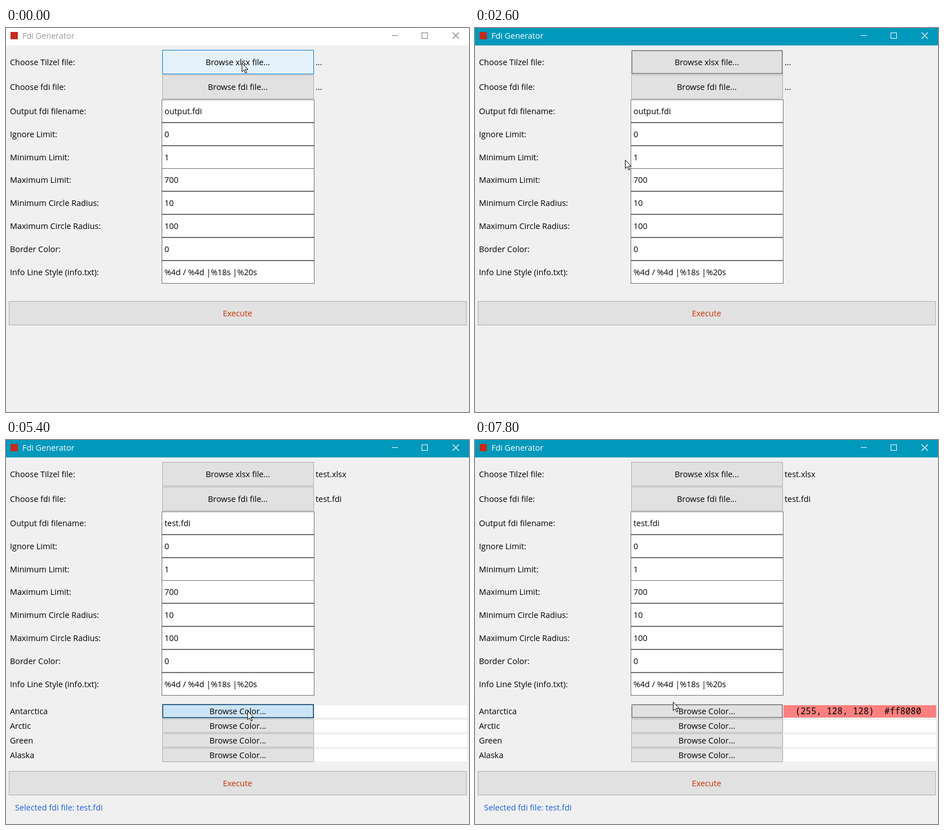
Animation, 821 px wide and 682 px high, one loop 8000 ms. Source, as an HTML page:

```html
<!DOCTYPE html>
<html lang="en">
<head>
<meta charset="utf-8">
<title>Fdi Generator</title>
<style>
  html, body { margin: 0; width: 100%; height: 100%; overflow: hidden; background: #f0f0f0; }
  svg { display: block; width: 821px; height: 682px; }
  text { font: 500 14.4px 'Open Sans', 'Noto Sans CJK SC', 'Noto Sans CJK', sans-serif; white-space: pre; }
  .cjk { font-size: 14px; font-weight: 400; }
  .mono { font: 12.4px 'Noto Sans Mono', 'Noto Sans CJK SC', monospace; }
  .lookup { font: 14.6px 'Noto Sans Mono', 'Noto Sans CJK SC', monospace; }
  .code { font: 15.5px 'Noto Sans Mono', monospace; }
  rect { shape-rendering: crispEdges; }
</style>
</head>
<body>
<svg viewBox="0 0 821 682">
  <defs>
    <g id="spectrum"></g>
    <filter id="shadow" x="-10%" y="-10%" width="120%" height="120%">
      <feGaussianBlur stdDeviation="5"/>
    </filter>
  </defs>
  <g id="stage"></g>
</svg>
<script>
const LOOP = 8000, STEP = 200, TEAL = '#0099bc';
const stage = document.getElementById('stage');
const range = n => [...Array(n).keys()];

// Drawing helpers; text is placed by its vertical centre
const box = (x, y, w, h, fill, stroke = 'none', extra = '') =>
  `<rect x="${x}" y="${y}" width="${w}" height="${h}" fill="${fill}" stroke="${stroke}" ${extra}/>`;
const path = (d, stroke, fill = 'none', extra = '') =>
  `<path d="${d}" stroke="${stroke}" fill="${fill}" ${extra}/>`;
const text = (s, x, y, fill = '#000', anchor = 'start', cls = '') =>
  `<text x="${x}" y="${Math.round(y + 5)}" fill="${fill}" text-anchor="${anchor}" class="${cls}">${s}</text>`;
const mid = (s, x, y, fill = '#000', cls = '') => text(s, x, y, fill, 'middle', cls);
const dotted = (x, y, w, h, color = '#000') => box(x, y, w, h, 'none', color, 'stroke-dasharray="1 1"');
const cross = (x, y, color) => path(`M${x} ${y}l11 11m0-11l-11 11`, color, 'none', 'stroke-width="1.2"');
const bevel = (x, y, w, h, fill, light, dark) => box(x, y, w, h, fill) +
  path(`M${x + .5} ${y + h}V${y + .5}H${x + w}`, light) +
  path(`M${x} ${y + h - .5}H${x + w - .5}V${y}`, dark);
const sunken = (x, y, w, h, fill) => bevel(x, y, w, h, fill, '#a0a0a0', '#fff') +
  path(`M${x + 1.5} ${y + h - 1}V${y + 1.5}H${x + w - 1}`, '#696969');
const raised = (x, y, w, h) => bevel(x, y, w, h, '#f0f0f0', '#fff', '#696969') +
  path(`M${x + 1} ${y + h - 1.5}H${x + w - 1.5}V${y + 1}`, '#a0a0a0');

// Pointer positions: time, x, y
const POINTER = [
  [0, 418, 62], [200, 418, 62], [800, 249, 227], [1000, 250, 230], [1400, 258, 351], [1600, 258, 345],
  [2200, 266, 234], [2600, 266, 234], [3000, 428, 122], [3200, 428, 122], [3600, 273, 222],
  [4000, 276, 224], [4200, 276, 224], [5000, 430, 479], [5400, 428, 481], [5600, 428, 481],
  [6000, 100, 167], [6400, 30, 111], [6800, 30, 111], [7400, 58, 462], [7600, 205, 464], [7800, 351, 465]
];

function pointerAt(t) {
  const next = POINTER.findIndex(k => k[0] > t);
  if (next < 0) return POINTER.at(-1).slice(1);
  const a = POINTER[next - 1], b = POINTER[next], p = (t - a[0]) / (b[0] - a[0]);
  return [1, 2].map(i => Math.round(a[i] + (b[i] - a[i]) * p));
}

const BUTTON = {
  normal: ['#e1e1e1', '#adadad'], focus: ['#e1e1e1', '#adadad'],
  hover: ['#e5f1fb', '#0078d7'], pressed: ['#cce4f7', '#005499']
};
function button(label, y, h, state = 'normal') {
  const focused = state === 'focus' || state === 'pressed';
  return box(277.5, y + .5, 268, h - 1, ...BUTTON[state]) +
    (focused ? dotted(278.5, y + 1.5, 266, h - 3) : '') + mid(label, 411, y + h / 2);
}

function titleBar(active) {
  const ink = active ? '#fff' : '#999', line = active ? '#fff' : '#777';
  return box(0, 0, 821, 30.5, active ? TEAL : '#fff') + box(8, 7, 13, 13, '#c42b1c') +
    text('Fdi Generator', 29, 13.5, ink) + path('M684 13.5h11', line) +
    box(737.5, 8.5, 10, 10, 'none', line) + cross(792, 8, line);
}

const LABELS = ['Choose Tilzel file:', 'Choose fdi file:', 'Output fdi filename:', 'Ignore Limit:',
  'Minimum Limit:', 'Maximum Limit:', 'Minimum Circle Radius:', 'Maximum Circle Radius:',
  'Border Color:', 'Info Line Style (info.txt):'];
const VALUES = ['0', '1', '700', '10', '100', '0', '%4d / %4d |%18s |%20s'];
const REGIONS = ['Antarctica', 'Arctic', 'Green', 'Alaska'];

function mainWindow(s) {
  const executeY = s.fdiChosen ? 588 : 485;
  const labelY = i => i < 2 ? 61 + 44 * i : 148 + 40.8 * (i - 2);
  let out = titleBar(s.active) +
    LABELS.map((label, i) => text(label, 7, labelY(i))).join('') +
    button('Browse xlsx file...', 39, 43, s.xlsxButton) +
    button('Browse fdi file...', 83, 43, s.fdiButton) +
    text(s.xlsxChosen ? 'test.xlsx' : '...', 549, 61) +
    text(s.fdiChosen ? 'test.fdi' : '...', 549, 105);
  [s.fdiChosen ? 'test.fdi' : 'output.fdi', ...VALUES].forEach((value, i) => {
    out += box(276.5, Math.round(127 + 40.8 * i) + .5, 270, 40, '#fff', '#707070') +
      text(value, 281, labelY(i + 2));
  });
  if (s.fdiChosen) {
    REGIONS.forEach((region, i) => {
      const y = 482 + 26 * i, filled = !i && s.colorSet;
      out += text(region, 7, y) + box(547, y - 11, 271, 22, filled ? '#ff8080' : '#fff') +
        button('Browse Color...', y - 13, 25, i ? 'normal' : s.colorButton);
      if (filled) out += text('(255, 128, 128)  #ff8080', 568, y, '#000', 'start', 'code');
    });
    out += text('Selected fdi file: test.fdi', 16, 653, '#1a5fe6');
  }
  return out + box(5.5, executeY + .5, 811, 42, '#e1e1e1', '#adadad') +
    mid('Execute', 410.5, executeY + 22, '#d03000');
}

const folder = (x, y) => box(x, y, 3, 14, '#f2cb62') + box(x + 3, y + 1, 8, 13, '#fadd8c');

function starPath(cx, cy, r) {
  return 'M' + range(10).map(i => {
    const a = i * Math.PI / 5 - 1.45, d = i % 2 ? r * .44 : r;
    return `${cx + d * Math.cos(a)} ${cy + d * Math.sin(a)}`;
  }).join('L') + 'z';
}

function sidebar() {
  return path(starPath(50, 126, 15), '#1773c4', '#2fa8f4') + path('M34 133l8-2M36 137l8-5', '#9ab') +
    box(30.5, 168.5, 33, 24, '#10a0fa', '#2272b0') +
    path('M30 224h13l3 3h18v25h-34z', 'none', '#ffdf7a') + box(32, 226, 9, 2, '#f0b030') +
    path('M36 252v-10q0-4 4-4h14q4 0 4 4v10h-6v-7h-10v7z', 'none', '#1c9be8') +
    path('M41 282l23 4-2 19-23-5z', '#456', '#2b9cec') + path('M31 309l8-5 17 3-8 5z', '#999', '#ddd') +
    '<circle cx="51" cy="350" r="12.5" fill="#3f7db3"/>' + path('M46 340l9 2 5 8-3 7-4-9z', 'none', '#9cc4de') +
    path('M31 349l21-4 1 15-21 4z', '#456', '#2b9cec') + path('M35 368l14-2', '#aaa') +
    ['快速访问', '桌面', '库', '此电脑', '网络']
      .map((name, i) => mid(name, 47, 150 + 57.6 * i, '#000', 'cjk')).join('');
}

function toolbar() {
  return path('M450 85l5-4v3h7v2h-7v3z', 'none', '#999') +
    path('M470.5 90.5v-10h5l2 2h6v8z', '#000', '#ffef8a') + path('M477 89v-5m-2 2l2-2 2 2m-2 3h4', '#000') +
    path('M491.5 90.5v-8h4l2 2h6v6z', '#000', '#ffef8a') + path('M501 82l4-3m-5 0l5 5', '#555') +
    box(513.5, 79.5, 13, 11, '#fff', '#000') + box(514, 80, 13, 2, '#333') +
    path('M516 84.5h9m-9 3h9', '#000', 'none', 'stroke-dasharray="2 1"') +
    path('M529 82h10l-5 5z', 'none', '#000');
}

function openDialog(s) {
  const rowY = i => 143.5 + 22.3 * i, file = s.secondFile ? 'test.fdi' : 'test.xlsx';
  const rowFill = s.rowSelected ? '#cce8ff' : s.rowHover ? '#e5f3ff' : '#fff';
  let out = box(0, 30, 821, 20, '#000', 'none', 'opacity=".08" filter="url(#shadow)"') +
    box(0, 30.5, 821, 35.5, TEAL) + box(0, 43, 11, 11, '#c42b1c') +
    text('打开', 17, 48.5, '#fff', 'start', 'cjk') + box(0, 66, 821, 616, '#f0f0f0') +
    text('查找范围(I):', 13, 85, '#000', 'start', 'lookup') +
    sunken(108, 74, 321, 23, '#fff') +
    folder(116, 79) + text('FdiGenerator', 135, 85.5, '#000', 'start', 'mono') +
    raised(411, 76, 16, 19) + path('M414 84h10l-5 5z', 'none', '#000') + toolbar() + sidebar() +
    box(108, 107, 713, 575, '#fff') + box(111, 221, 710, 22, rowFill) +
    [463, 620, 777].map(x => box(x - 1, 107, 1, 575, '#e8f0f6')).join('') +
    path('M281.5 112.5l4-4 4 4', '#666');
  ['名称', '修改日期', '类型', '大小'].forEach((head, i) => {
    out += text(head, i ? 312 + 157 * i : 113, 120.5, '#000', 'start', 'cjk');
  });
  ['images', 'info', 'output', 'resources', file].forEach((name, i) => {
    const y = rowY(i), type = i < 4 ? '文件夹' : s.secondFile ? 'FDI 文件' : 'Norvelise Tilzel 工...';
    out += text(name, 136, y) + text('2016/5/16 22:43', 469, y) + text(type, 626, y) +
      (i < 4 ? folder(118, Math.round(y) - 8) : '');
  });
  return out + (s.secondFile
    ? path('M118.5 224.5h9l4 4v12h-13z', '#888', '#fff') + path('M127.5 224.5v4h4', '#888')
    : box(116, 225, 15, 15, '#1f6b48'));
}

const PALETTE = `f8a ff8 7f8 0f8 8ff 08f f8a f8e f00 ff0 8f0 0f4 0ff 09c 88c f0f
  644 f84 0f0 088 048 88f 804 f08 820 f80 080 083 00f 009 808 80f
  300 820 042 042 009 304 304 508 000 860 885 888 489 bbb 304 fff`.split(/\s+/);

function colorDialog(s) {
  const swatch = (i, y, fill) => sunken(Math.round(17 + 36.2 * (i % 8)), Math.round(y + 31.5 * (i >> 3)), 29, 27, fill);
  const label = (str, x, y, anchor = 'start', fill = '#000') => text(str, x, y, fill, anchor, 'cjk');
  const focusY = s.picked ? 93.5 : 251.5, levelY = s.picked ? 137 : 337;
  const values = s.picked ? [0, 240, 180, 255, 128, 128] : [160, 0, 0, 0, 0, 0];
  let out = box(10, 40, 658, 454, '#000', 'none', 'opacity=".12" filter="url(#shadow)"') +
    box(4.5, 31.5, 661, 459, '#f0f0f0', TEAL) + box(4, 31, 662, 29, TEAL) +
    label('颜色', 8, 45.5, 'start', '#fff') + cross(640, 40, '#fff') +
    label('基本颜色(B):', 13, 79) + label('自定义颜色(C):', 13, 316);
  PALETTE.forEach((c, i) => { out += swatch(i, 96, '#' + c); });
  range(16).forEach(i => { out += swatch(i, 332, `rgb(${255 - 9.7 * i},${i},${10 * i})`); });
  out += box(15.5, focusY + 2, 31, 28, 'none', '#000') + dotted(14.5, focusY, 33, 31);

  out += '<use href="#spectrum"/>' + (s.picked
    ? path('M325 70v5m4-4h4m-10 6h3', '#000', 'none', 'stroke-width="3"')
    : path('M507 326v6m-9 5h6m6 0h6', '#000', 'none', 'stroke-width="3"'));
  const bands = 33;
  range(bands).forEach(i => {
    const y = 70 + i * 267 / bands;
    out += box(622, y, 32, 9, `hsl(0 ${s.picked ? 100 : 0}% ${100 - i * 100 / (bands - 1)}%)`);
  });
  out += path('M621.5 338V69.5H654', '#999') + path(`M656 ${levelY}l9-9.5v19z`, 'none', '#000') +
    box(322, 348, 83, 59, s.picked ? '#ff8080' : '#000') + label('颜色|纯色(O)', 328, 423);

  ['色调(E):', '饱和度(S):', '亮度(L):', '红(R):', '绿(G):', '蓝(U):'].forEach((name, i) => {
    const right = i > 2, y = 348 + 32.5 * (i % 3);
    out += label(name, right ? 614 : 516, y + 14.5, 'end') +
      sunken(right ? 619 : 523, Math.round(y), 38, 28, '#fff') + text(values[i], right ? 623 : 527, y + 13);
  });

  const more = '规定自定义颜色(D) &gt;&gt;';
  return out + raised(13, 408, 281, 33) + mid(more, 154, 426, '#fff', 'cjk') + mid(more, 153, 425, '#a0a0a0', 'cjk') +
    raised(13, 446, 92, 32) + box(13.5, 446.5, 91, 31, 'none', '#696969') + raised(107, 446, 92, 32) +
    raised(322, 446, 335, 32) + mid('确定', 58.5, 462, '#000', 'cjk') + mid('取消', 152.5, 462, '#000', 'cjk') +
    mid('添加到自定义颜色(A)', 489, 462, '#000', 'cjk');
}

// Hue runs across and saturation down, in cells whose steps start at another height in each column
function buildSpectrum() {
  const cell = 6, levels = 9;
  let out = '';
  for (let x = 0; x < 276; x += cell) {
    const hue = x / 276 * 6, phase = Math.abs(Math.sin(x * 12.9)) * .9;
    for (let y = 0; y < 267; y += cell) {
      const sat = Math.min(1, (Math.floor((1 - y / 267) * levels + phase) + .5 - phase + .5 * phase) / levels);
      const rgb = [0, 4, 2].map(shift => {
        const d = Math.abs((hue + shift) % 6 - 3) - 1;
        return Math.round(255 * (.5 + (Math.max(0, Math.min(1, d)) - .5) * sat));
      });
      out += box(323 + x, 70 + y, cell, Math.min(cell, 267 - y), `rgb(${rgb})`);
    }
  }
  document.getElementById('spectrum').innerHTML = out;
}

const pointer = ([x, y]) =>
  path('M.5.5v15l3.5-3.2 2.7 5.8 2.2-1-2.7-5.6h4.8z', '#000', '#fff', `transform="translate(${x} ${y})"`);

function stateAt(t) {
  const within = (a, b) => t >= a && t < b;
  const at = pointerAt(t), opening = within(200, 2600) || within(3200, 4200), picking = within(5600, 7600);
  return {
    at, opening, picking,
    active: t > 0 && !opening && !picking,
    xlsxChosen: t >= 2800, fdiChosen: t >= 4400, colorSet: t >= 7800,
    secondFile: t >= 3200, picked: t >= 6800,
    rowHover: at[1] >= 221 && at[1] < 243, rowSelected: within(2200, 2600) || within(4000, 4200),
    xlsxButton: t < 200 ? 'hover' : within(2600, 3200) ? 'focus' : 'normal',
    fdiButton: within(3000, 3200) ? 'hover' : within(4200, 5000) ? 'focus' : 'normal',
    colorButton: t < 5000 || picking ? 'normal' : t < 5400 ? 'hover' : t < 5600 ? 'pressed' : 'focus'
  };
}

let shown = -1;
function tick() {
  const t = Math.floor(performance.now() % LOOP / STEP) * STEP;
  if (t !== shown) {
    const s = stateAt(t);
    stage.innerHTML = box(0, 0, 821, 682, '#f0f0f0') + mainWindow(s) +
      (s.opening ? openDialog(s) : '') + (s.picking ? colorDialog(s) : '') + pointer(s.at);
    shown = t;
  }
  requestAnimationFrame(tick);
}

buildSpectrum();
tick();
</script>
</body>
</html>
```
